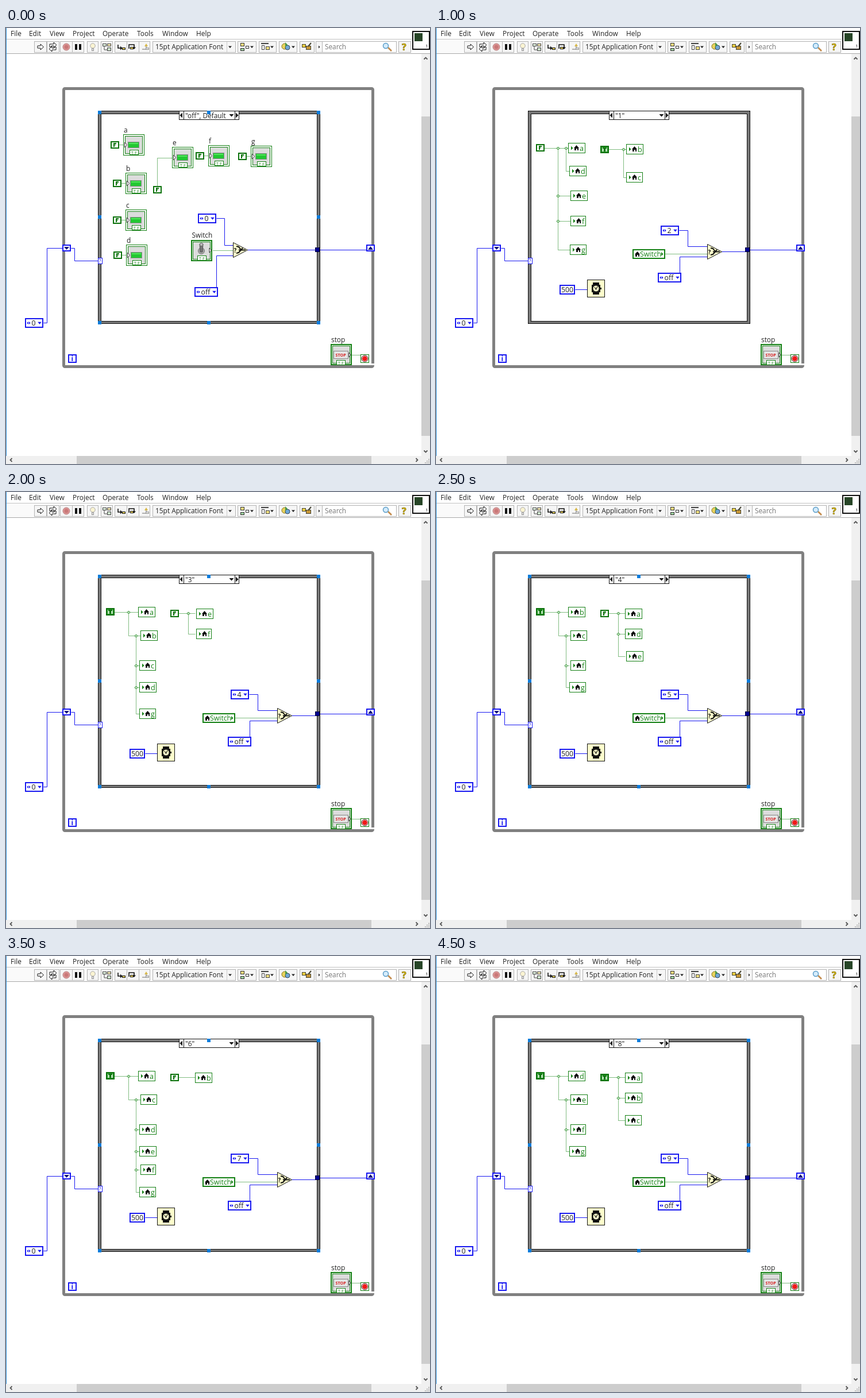
Recreate the animation shown at these times as an HTML page with a canvas. Size 738 by 759 pixels, loop 5000 ms.

```html
<!DOCTYPE html>
<html lang="en">
<head>
<meta charset="utf-8">
<title>Block diagram case structure</title>
<style>
html, body { margin: 0; width: 100%; height: 100%; overflow: hidden; background: #fff; }
canvas { display: block; }
</style>
</head>
<body>
<canvas id="c" width="738" height="759"></canvas>
<script>
const g = document.getElementById('c').getContext('2d');
const BLUE = '#1818f0', GREEN = '#148014', INK = '#111', PICK = '#0a7cdc', CREAM = '#ffffcc';
const FONT = '"Open Sans", "Noto Sans", sans-serif';
const STEP = 500;

function box(x, y, w, h, fill, stroke, t = 1) {
  if (stroke) { g.fillStyle = stroke; g.fillRect(x, y, w, h); }
  g.fillStyle = fill;
  const d = stroke ? t : 0;
  g.fillRect(x + d, y + d, w - 2 * d, h - 2 * d);
}
function text(s, x, y, color = '#222', size = 11.9, style = '') {
  g.font = `${style} ${size}px ${FONT}`;
  g.fillStyle = color;
  g.fillText(s, x, y);
}
function path(pts, close) {
  g.beginPath();
  for (let i = 0; i < pts.length; i += 2) g.lineTo(pts[i], pts[i + 1]);
  if (close) g.closePath();
}
function poly(pts, fill, stroke) {
  path(pts, true);
  g.fillStyle = fill; g.fill();
  if (stroke) { g.strokeStyle = stroke; g.lineWidth = 1; g.stroke(); }
}
function line(pts, color, w = 1) {
  path(pts);
  g.strokeStyle = color; g.lineWidth = w; g.stroke();
}
function circle(x, y, r, fill, stroke, w = 1) {
  g.beginPath(); g.arc(x, y, r, 0, 7);
  if (fill) { g.fillStyle = fill; g.fill(); }
  if (stroke) { g.strokeStyle = stroke; g.lineWidth = w; g.stroke(); }
}
const down = (x, y, r, c) => poly([x - r, y - r / 2, x + r, y - r / 2, x, y + r / 2 + .5], c);
const right = (x, y, r, c) => poly([x, y - r, x + r, y, x, y + r], c);
const left = (x, y, r, c) => poly([x, y - r, x - r, y, x, y + r], c);

const wire = (...pts) => line(pts.map(v => v + .5), BLUE);
function dots(...pts) {
  const p = pts.map(v => v + .5);
  line(p, '#a4d0a4');
  g.setLineDash([1, 1]);
  line(p, '#5fa85f');
  g.setLineDash([]);
}
function joint(x, y) {
  x += .5; y += .5;
  poly([x - 2.5, y, x, y - 2.5, x + 2.5, y, x, y + 2.5], '#c4e4c4', GREEN);
}

// ---- window furniture ----
function button(x, w) { box(x, 23, w, 20, '#f6f6f6', '#b4b4b4'); }
function runArrow(x, y) {
  poly([x - 5, y - 2, x, y - 2, x, y - 5, x + 5.5, y, x, y + 5, x, y + 2, x - 5, y + 2], '#fff', INK);
}
function loopArrow(x, y, s) {
  const pts = [-6, 1, -6, -4, 1, -4, 1, -7, 6, -2.5, 1, 2, 1, -1, -3, -1, -3, 1];
  poly(pts.map((v, i) => s * v + (i % 2 ? y : x)), '#fff', INK);
}
function stepIcon(x, kind) {
  const c = kind === 2 ? '#999' : INK;
  const pts = [[-6, -4, -6, 2, -1, 2], [-6, 3, -6, -4, 3, -4, 3, 2], [-5, 4, 2, 4, 2, -2]][kind];
  line(pts.map((v, i) => v + (i % 2 ? 33 : x)), c, 1.6);
  if (kind === 0) right(x - 2, 35, 3.5, c);
  if (kind === 1) down(x + 3, 35, 3, c);
  if (kind === 2) poly([x - 1, 32, x + 2, 27, x + 5, 32], '#d8b84a');
  box(x + (kind === 1 ? -4 : 1), kind === 1 ? 33 : 34, 6, 4, kind === 2 ? '#ddd' : '#f0d860', c);
}
function menuBar() {
  box(0, 0, 738, 45, '#fff');
  box(0, 20, 706, 25, '#fafafa');
  [['File', 8], ['Edit', 40], ['View', 76], ['Project', 116], ['Operate', 168],
   ['Tools', 228], ['Window', 272], ['Help', 331]].forEach(([s, x]) => text(s, x, 13.5));
  box(0, 19, 706, 1, '#c4c4c4');
  box(0, 44, 738, 1, '#a8a8a8');

  [[49, 22], [71, 22], [94, 22], [115, 21], [141, 20], [165, 21], [189, 22], [210, 22], [231, 20],
   [255, 145], [403, 33], [440, 31], [475, 32], [511, 26], [539, 12], [683, 22]].forEach(b => button(...b));
  runArrow(60, 33);
  loopArrow(82, 32, 1); loopArrow(81, 34, -1);
  circle(105, 33, 6, '#dc9494', '#b98080');
  circle(105, 33, 3.5, '#c97878');
  box(120, 28, 4, 10, INK); box(127, 28, 4, 10, INK);
  circle(151, 31, 4.2, '#fbf4d2', '#aaa'); box(149, 35, 4, 5, '#ddd', '#999');
  box(168, 27, 7, 5, '#dff0df', '#444'); box(176, 27, 7, 5, '#f3e6b0', '#444');
  line([171, 32, 171, 38, 177, 38], '#444'); box(176, 34, 7, 6, '#cde5cd', '#444');
  stepIcon(201, 0); stepIcon(220, 1); stepIcon(242, 2);

  text('15pt Application Font', 260, 37);
  box(384, 24, 1, 18, '#ccc');
  down(390, 33, 3, '#222');
  box(408, 26, 7, 6, '#f2e080', '#333'); box(408, 35, 7, 5, '#9ccf9c', '#333'); box(417, 31, 6, 5, '#fff', '#333');
  down(428, 33, 3, '#222');
  box(444, 26, 13, 2, '#444'); box(445, 30, 5, 8, '#fff', '#444'); box(452, 32, 7, 6, '#f2e080', '#444');
  down(463, 33, 3, '#222');
  circle(485, 32, 5, '#e9d35c', '#887722'); circle(490, 34, 4, '#6fa8d8', '#345');
  right(486, 29, 4, '#4a9a4a'); down(500, 33, 3, '#222');
  box(515, 28, 7, 6, '#f2d040', '#443'); box(522, 31, 9, 7, '#c89838', '#443');
  line([531, 26, 526, 32], '#443', 2);
  right(544, 33, 2.5, '#222');
  box(550, 23, 130, 20, '#fff', '#b4b4b4');
  text('Search', 555, 37, '#777', 11.8);
  line([665, 34, 671, 40], '#c28a4a', 2.6);
  circle(661, 31, 4.5, '#d5ecfb', '#5a9cc8', 1.5);
  text('?', 689, 39, '#d8b800', 16, 'bold');
  g.strokeStyle = '#665500'; g.lineWidth = .6; g.strokeText('?', 689, 39);

  box(707, 5, 31, 33, '#fff', INK, 2);
  box(711, 9, 14, 14, '#274527');
  text('1', 730, 34, INK, 8);
}
function chevron(x, y, dx, dy) {
  line([x - 3 * dy - dx * 1.5, y - 3 * dx - dy * 1.5, x + dx * 1.5, y + dy * 1.5,
        x + 3 * dy - dx * 1.5, y + 3 * dx - dy * 1.5], '#555', 1.8);
}
function scrollBars() {
  box(723, 45, 15, 700, '#f0f0f0');
  box(723, 154, 15, 556, '#cdcdcd');
  box(0, 745, 738, 14, '#f0f0f0');
  box(123, 745, 513, 14, '#cdcdcd');
  chevron(730.5, 53, 0, -1); chevron(730.5, 737, 0, 1);
  chevron(9, 752, -1, 0); chevron(715, 752, 1, 0);
  for (let i = 0; i < 3; i++) for (let j = 0; j <= i; j++) box(735 - 3 * j, 750 + 3 * i, 2, 2, '#bbb');
  box(0, 0, 1, 745, '#3294dc');
}

// ---- diagram parts ----
function ring(x, y, s) {
  const w = s === 'off' ? 41 : 32;
  box(x, y, w, 17, '#fff', BLUE, 2);
  left(x + 6, y + 8.5, 2.6, BLUE); right(x + 7, y + 8.5, 2.6, BLUE);
  text(s, x + 11.5, y + 13, '#222', 12.3);
  down(x + w - 6.5, y + 8.5, 3.3, BLUE);
}
function bool(x, y, s) {
  const on = s === 'T';
  box(x, y, 15, 13, on ? '#2f9a2f' : '#fff', '#0b720b', 2);
  if (on) { box(x + 3, y + 3, 9, 7, '#b4e0b4'); box(x + 4, y + 3, 7, 2, '#0b720b'); box(x + 6, y + 4, 3, 6, '#0b720b'); }
  else { box(x + 5, y + 3, 2, 7, '#0b720b'); box(x + 5, y + 3, 5, 2, '#0b720b'); box(x + 5, y + 6, 4, 1, '#0b720b'); }
}
function house(x, y) {
  poly([x, y, x + 4.5, y - 5, x + 9, y], INK);
  box(x + 1, y - 1, 7, 5, INK); box(x + 4, y + 1, 2, 3, '#fff');
}
function local(s, x, y) {
  g.font = `12.6px ${FONT}`;
  box(x, y - 9, Math.round(22.6 + g.measureText(s).width), 18, '#fff', GREEN);
  right(x + 5, y, 3.5, GREEN);
  house(x + 10, y);
  text(s, x + 20, y + 4.5, GREEN, 12.6);
}
function tfTag(x, y) {
  box(x, y, 16, 9, '#fff', GREEN);
  text('T', x + 3, y + 7.5, GREEN, 7); text('F', x + 9, y + 7.5, GREEN, 7);
}
function terminal(x, y, t = 1) {
  box(x, y, 37, 37, '#fff', GREEN, t);
  box(x + 3, y + 3, 31, 31, '#dcdcdc', GREEN);
}
function led(name, x, y) {
  text(name, x + 1, y - 3.5);
  terminal(x, y);
  box(x + 8, y + 13, 20, 11, '#22c832', '#8a8a8a');
  box(x + 10, y + 15, 16, 2, '#52e45c');
  poly([x + 2.5, y + 14, x + 6.5, y + 18.5, x + 2.5, y + 23], '#fff', '#333');
  tfTag(x + 11, y + 27);
}
function select(x, y) {
  poly([x + .5, y - 12.5, x + 25.5, y + .5, x + .5, y + 13.5], CREAM, INK);
  text('?', x + 1.5, y + 5, INK, 10, 'bold');
  line([x + 6, y - 6, x + 10, y - 5, x + 14, y], INK, 2);
  line([x + 6, y + 6, x + 10, y + 5, x + 17, y - 3], INK, 2);
  line([x + 10, y + .5, x + 22, y + .5], INK, 2);
}
function register(x, up) {
  box(x, 377, 15, 12, '#fff', BLUE, 2);
  poly(up ? [x + 3, 386, x + 12, 386, x + 7.5, 380] : [x + 3, 381, x + 12, 381, x + 7.5, 386], '#10107c');
}
function whileLoop() {
  g.strokeStyle = '#808080'; g.lineWidth = 5;
  g.beginPath(); g.roundRect(100.5, 105.5, 538, 484, 2); g.stroke();
  box(635, 583, 7, 4, '#fff'); box(636, 583, 5, 1, '#808080');
  wire(65, 513, 71, 513, 71, 383, 98, 383);
  wire(113, 383, 119, 383, 119, 405, 160, 405);
  wire(546, 386, 627, 386, 627, 383);
  register(98, false); register(627, true);
  ring(33, 505, '0');
  box(108, 568, 15, 15, '#fff', BLUE, 2);
  text('i', 113.5, 580, BLUE, 12, 'bold');

  text('stop', 566, 546.5);
  terminal(565, 550, 2);
  box(570, 562, 26, 14, '#e4e4e4', '#888');
  text('STOP', 573.5, 572, '#d82020', 7.2, 'bold');
  poly([597, 565, 600, 569, 597, 573], '#fff', '#333');
  tfTag(575, 578);
  dots(602, 569, 617, 569);
  box(617, 568, 15, 15, '#fff', GREEN);
  circle(624.5, 575.5, 5.5, '#fff', '#400');
  circle(624.5, 575.5, 4.3, '#f01818');
}

const tile = document.createElement('canvas');
tile.width = tile.height = 2;
const tg = tile.getContext('2d');
tg.fillStyle = '#ddd'; tg.fillRect(0, 0, 2, 2);
tg.fillStyle = '#111'; tg.fillRect(0, 0, 1, 1); tg.fillRect(1, 1, 1, 1);
const hatch = g.createPattern(tile, 'repeat');

function caseFrame(label, picked) {
  box(160, 144, 387, 371, hatch, INK);
  box(165, 149, 377, 362, '#fff', INK);
  box(301, 144, 105, 16, '#fff', INK);
  box(309, 144, 1, 16, INK); box(398, 144, 1, 16, INK);
  left(307, 152, 4.5, INK); right(400, 152, 4.5, INK);
  down(392.5, 152, 4, INK);
  text(label, 312, 156.5, '#222', 11.8);
  box(160, 400, 8, 11, '#fff', BLUE);
  text('?', 161.5, 409, BLUE, 8.5);
  if (!picked) return;
  for (const x of [163, 353, 544]) for (const y of [147, 329, 513])
    if (x !== 353 || y !== 329) box(x - 3, y - 3, 6, 6, PICK);
}
const tunnel = () => box(538, 382, 8, 8, '#000090', '#000040');

function offCase() {
  for (const [s, x, y, fx, fy] of [['a', 204, 185, 182, 197], ['b', 208, 252, 186, 264], ['c', 208, 316, 186, 328],
    ['d', 209, 377, 187, 389], ['e', 289, 207, 256, 275], ['f', 352, 204, 330, 216], ['g', 426, 205, 404, 217]]) {
    if (s === 'e') dots(263, 275, 263, 226, 289, 226);
    else dots(fx + 15, fy + 6, x, fy + 6);
    led(s, x, y);
    bool(fx, fy, 'F');
  }
  wire(366, 331, 380, 331, 380, 378, 395, 378);
  wire(366, 451, 366, 396, 395, 396);
  dots(360, 387, 395, 387);
  wire(420, 386, 538, 386);
  ring(334, 323, '0'); ring(328, 451, 'off');
  text('Switch', 323.5, 365, '#222', 11.8);
  terminal(322, 369, 2);
  circle(340, 388, 5.5, '#aaa', '#777');
  poly([337, 376, 343, 376, 342, 390, 338, 390], '#777', '#555');
  circle(340, 377, 2.8, '#bbb', '#666');
  poly([354, 383, 357.5, 387, 354, 391], '#fff', '#333');
  tfTag(333, 396);
  select(395, 386);
}
function digitCase(n) {
  wire(423, 352, 438, 352, 438, 380, 472, 380);
  wire(424, 426, 424, 398, 472, 398);
  dots(399, 393, 472, 393);
  wire(497, 389, 538, 389);
  ring(391, 344, String(n + 1)); ring(386, 426, 'off');
  box(342, 385, 57, 17, '#fff', GREEN, 2);
  house(346, 394);
  text('Switch', 355, 397.5, GREEN, 12.3);
  right(392, 393.5, 3.5, GREEN);
  select(472, 389);
  wire(242, 455, 263, 455);
  box(215, 447, 27, 17, '#fff', BLUE, 2);
  text('500', 218, 460, '#222', 12.2);
  box(263, 438, 31, 31, CREAM, INK);
  box(273, 443, 11, 21, INK); box(271, 447, 15, 13, INK);
  circle(278.5, 453.5, 5.5, CREAM, INK);
  line([276, 451, 278.5, 455, 281, 450], INK, 1.2);
  box(286, 452, 2, 3, INK);
}

// Each branch column hangs its locals from a shared dotted wire.
function leftChain(names) {
  const ys = [209, 250, 302, 340, ...(names.length > 5 ? [372, 411] : [386])];
  dots(188, 209, 230, 209);
  dots(213, 209, 213, 250, 234, 250);
  joint(213, 209);
  const last = names.length - 1;
  if (last > 1) { dots(226, 250, 226, ys[last]); joint(226, 250); }
  [...names].forEach((s, i) => {
    if (i > 1) dots(226, ys[i], 232, ys[i]);
    if (i > 1 && i < last) joint(226, ys[i]);
    local(s, (i ? i === 1 ? 234 : 232 : 230) + (s === 'f' && i > 1 ? 2 : 0), ys[i]);
  });
}
function rightChain(names) {
  const ys = [212, 247, 286], last = names.length - 1;
  dots(301, 211, 329, 211);
  if (last) { dots(317, 211, 317, ys[last]); joint(317, 211); }
  [...names].forEach((s, i) => {
    if (i) dots(317, ys[i], 329, ys[i]);
    if (i && i < last) joint(317, ys[i]);
    local(s, 329 + (s === 'e' || s === 'f' ? 2 : 0), ys[i]);
  });
}
function zeroTree() {
  dots(188, 209, 230, 209); dots(207, 209, 207, 242, 235, 242);
  dots(230, 242, 230, 284, 235, 284); dots(226, 242, 226, 330, 232, 330);
  dots(210, 242, 210, 366, 235, 366); dots(229, 366, 229, 402, 234, 402);
  dots(301, 211, 322, 211);
  [[207, 209], [210, 242], [226, 242], [230, 242], [229, 366]].forEach(p => joint(...p));
  [['a', 230, 209], ['b', 235, 242], ['c', 235, 284], ['d', 232, 330], ['e', 235, 366], ['f', 234, 402],
   ['g', 322, 213]].forEach(p => local(...p));
}
function oneTree() {
  dots(188, 209, 230, 209); dots(226, 209, 226, 249, 232, 249);
  dots(212, 209, 212, 386, 233, 386); dots(212, 292, 234, 292); dots(212, 336, 235, 336);
  dots(301, 211, 331, 211); dots(326, 211, 326, 260, 332, 260);
  [[212, 209], [226, 209], [212, 292], [212, 336], [326, 211]].forEach(p => joint(...p));
  [['a', 230, 209], ['d', 232, 249], ['e', 234, 292], ['f', 234, 336], ['g', 233, 386],
   ['b', 331, 211], ['c', 331, 260]].forEach(p => local(...p));
}

// value and locals of the left and right columns, per digit
const digits = [['T', '', 'F', ''], ['F', '', 'T', ''], ['T', 'abdeg', 'F', 'cf'], ['T', 'abcdg', 'F', 'ef'],
  ['T', 'bcfg', 'F', 'ade'], ['T', 'acdfg', 'F', 'be'], ['T', 'acdefg', 'F', 'b'],
  ['F', 'defg', 'T', 'abc'], ['T', 'defg', 'T', 'abc']];

function draw(i) {
  const n = i - 1;
  box(0, 0, 738, 759, '#fff');
  menuBar();
  scrollBars();
  whileLoop();
  caseFrame(n < 0 ? '"off", Default' : `"${n}"`, n < 0 || n > 2);
  if (n < 0) offCase();
  else {
    const [lv, ls, rv, rs] = digits[n];
    if (n === 0) zeroTree();
    else if (n === 1) oneTree();
    else { leftChain(ls); rightChain(rs); }
    bool(174, 202, lv);
    bool(286, 205, rv);
    digitCase(n);
  }
  tunnel();
}

const start = performance.now();
let shown = -1;
function tick(now) {
  const i = Math.floor(Math.max(0, now - start) / STEP) % 10;
  if (i !== shown) draw(shown = i);
  requestAnimationFrame(tick);
}
draw(shown = 0);
requestAnimationFrame(tick);
</script>
</body>
</html>
```
